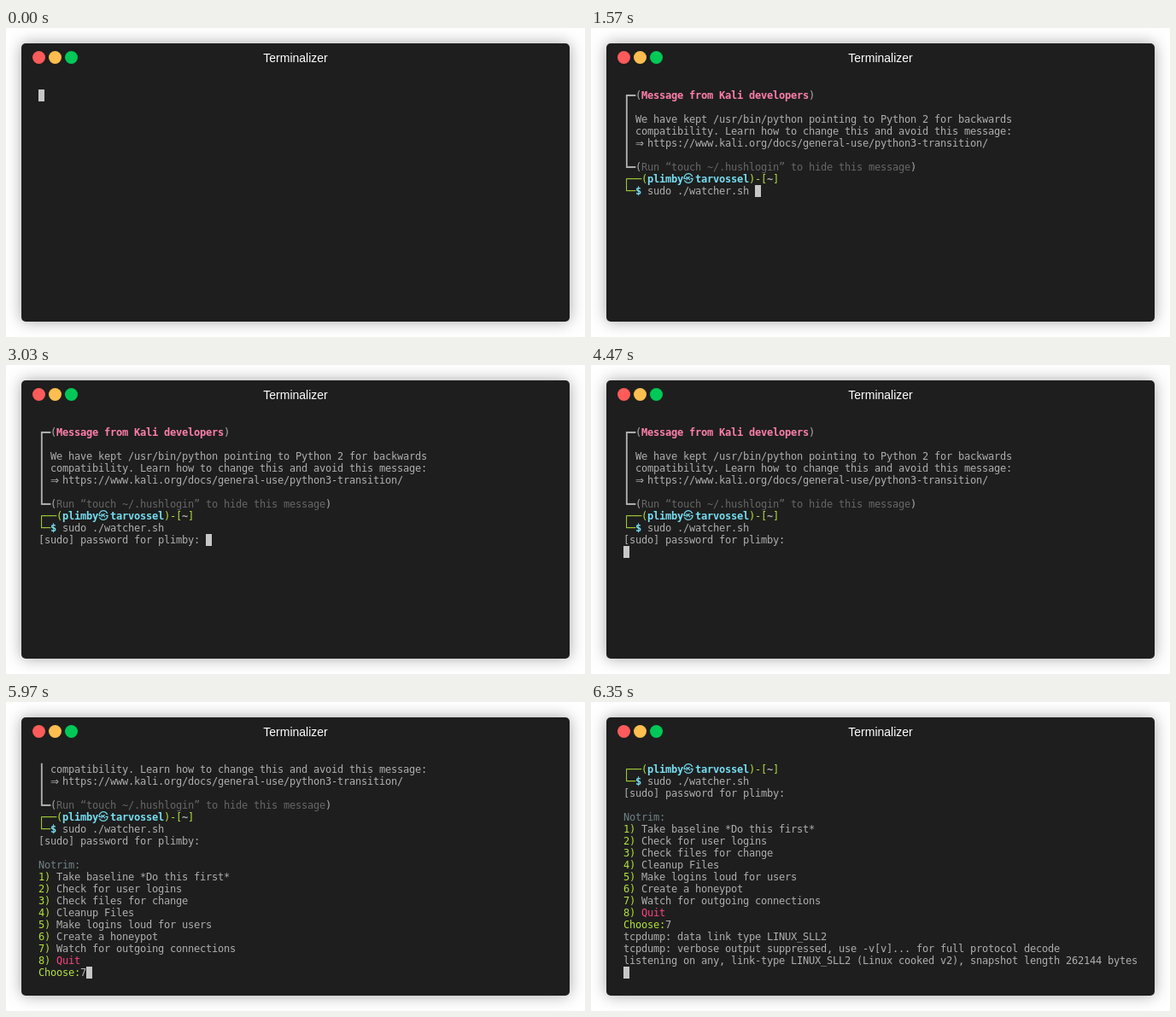
Write an HTML page with a canvas that moves like this. It is 678x362 px and loops after 8 s.

```html
<!DOCTYPE html>
<html lang="en">
<head>
<meta charset="utf-8">
<title>Terminal</title>
<style>
  html, body { margin: 0; width: 100%; height: 100%; overflow: hidden; background: #fff; }
  #window {
    position: absolute; left: 18px; top: 18px; width: 642px; height: 326px;
    border-radius: 5px; background: #1e1e1e; box-shadow: 0 0 18px rgba(0, 0, 0, .35);
  }
  #title {
    position: absolute; top: 9px; width: 100%; text-align: center; color: #fff;
    font: 14px/16px "Liberation Sans", Arial, sans-serif;
  }
  i { position: absolute; top: 9px; width: 15px; height: 15px; border-radius: 50%; }
  canvas { position: absolute; left: 0; top: 0; }
</style>
</head>
<body>
<div id="window">
  <i style="left: 13px; background: #ff5b5b"></i>
  <i style="left: 32px; background: #ffbe4f"></i>
  <i style="left: 51px; background: #00c957"></i>
  <div id="title">Terminalizer</div>
</div>
<canvas width="678" height="362"></canvas>
<script>
const ctx = document.querySelector('canvas').getContext('2d');
const LEFT = 38, TOP = 72, CELL = 7, LINE = 14, ROWS = 18, LOOP = 8000;

const span = (color, bold = false) => text => ({ text, color, bold });
const plain = span('#afafaf'), dim = span('#676767'), green = span('#b3e33b');
const red = span('#fc4384'), cyan = span('#708387');
const pink = span('#ff7fac', true), blue = span('#75dff2', true), strong = span('#afafaf', true);

const intro = [
  [plain('┏━('), pink('Message from Kali developers'), plain(')')],
  [plain('┃')],
  [plain('┃ We have kept /usr/bin/python pointing to Python 2 for backwards')],
  [plain('┃ compatibility. Learn how to change this and avoid this message:')],
  [plain('┃ ⇒ https://www.kali.org/docs/general-use/python3-transition/')],
  [plain('┃')],
  [plain('┗━('), dim('Run “touch ~/.hushlogin” to hide this message'), plain(')')],
  [green('┌──('), blue('plimby㉿tarvossel'), green(')-['), strong('~'), green(']')],
];
const prompt = [green('└─'), blue('$'), plain(' ')];
const typed = [...intro, [...prompt, plain('sudo ./watcher.sh ')]];
const password = [...typed, [plain('[sudo] password for plimby: ')]];
const items = [
  'Take baseline *Do this first*', 'Check for user logins', 'Check files for change',
  'Cleanup Files', 'Make logins loud for users', 'Create a honeypot',
  'Watch for outgoing connections', 'Quit',
];
const menu = [
  ...password, [], [cyan('Notrim:')],
  ...items.map((item, n) => [green(`${n + 1}) `), (item === 'Quit' ? red : plain)(item)]),
];
const chosen = [...menu, [green('Choose:'), plain('7')]];
const output = [
  'tcpdump: data link type LINUX_SLL2',
  'tcpdump: verbose output suppressed, use -v[v]... for full protocol decode',
  'listening on any, link-type LINUX_SLL2 (Linux cooked v2), snapshot length 262144 bytes',
].map(text => [plain(text)]);

// Start time and terminal contents; the cursor follows the last line.
const steps = [
  [0, [[]]],
  [20, [...intro, prompt]],
  [1570, typed],
  [2930, [...typed, []]],
  [3030, password],
  [4470, [...password, []]],
  [4500, [...menu, [green('Choose:')]]],
  [5970, chosen],
  [6250, [...chosen, []]],
  [6350, [...chosen, ...output, []]],
];

function drawLine(line, y) {
  let x = LEFT;
  for (const { text, color, bold } of line) {
    ctx.fillStyle = color;
    for (const char of text) {
      const family = char === '⇒' ? '"DejaVu Sans"' : '"DejaVu Sans Mono", "Noto Sans CJK KR"';
      ctx.font = `${bold ? 'bold ' : ''}12px ${family}, monospace`;
      ctx.fillText(char, x, y + 11);
      x += char === '㉿' ? 2 * CELL : CELL;
    }
  }
  return x;
}

let shown;
function render(now) {
  const time = now % LOOP;
  const [, lines] = steps.findLast(([start]) => start <= time);
  if (lines !== shown) {
    shown = lines;
    ctx.clearRect(0, 0, 678, 362);
    let x, y;
    lines.slice(-ROWS).forEach((line, row) => {
      y = TOP + row * LINE;
      x = drawLine(line, y);
    });
    ctx.fillStyle = '#c7c7c7';
    ctx.fillRect(x, y, CELL, LINE);
  }
  requestAnimationFrame(render);
}
render(performance.now());
</script>
</body>
</html>
```
